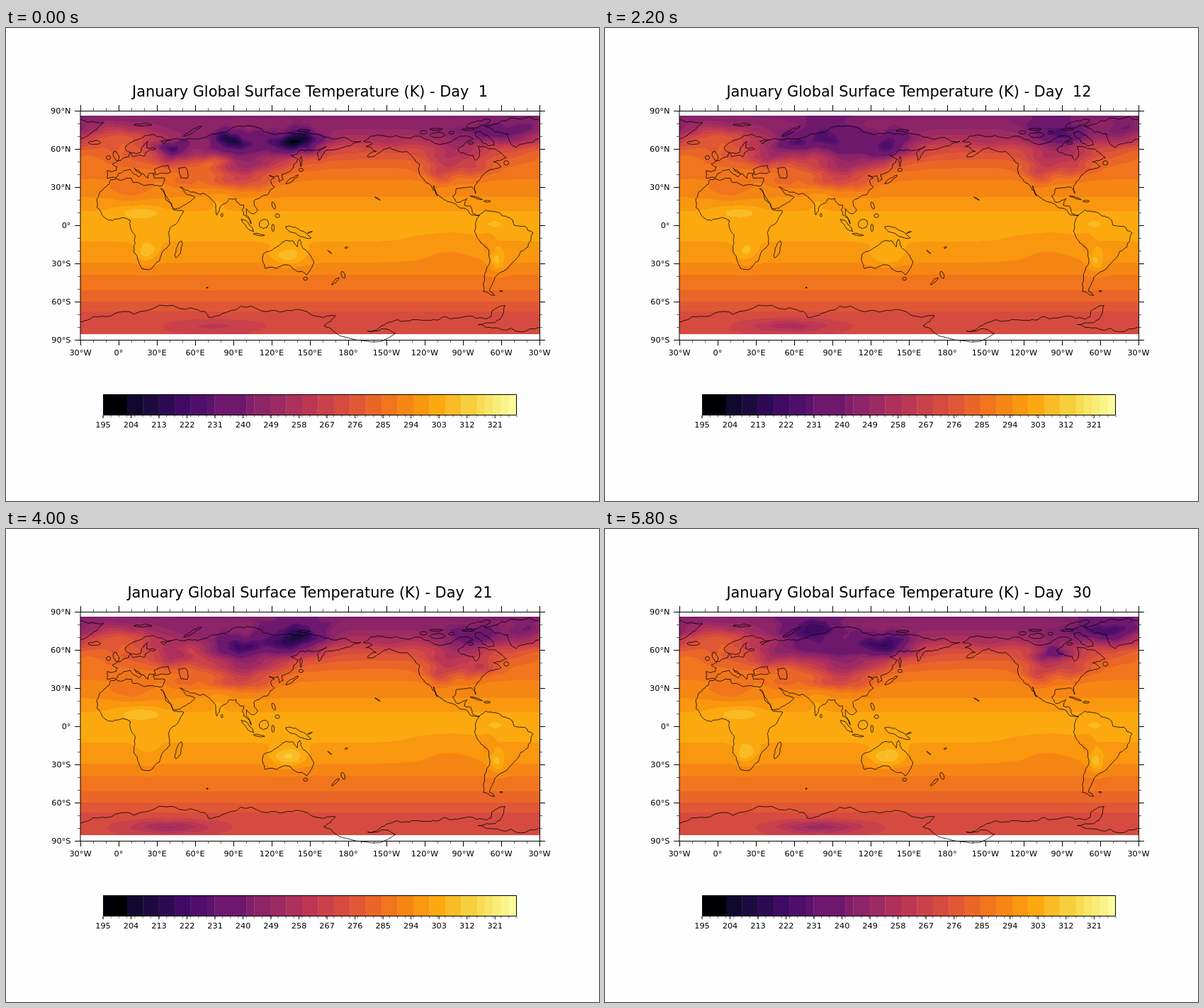
Animation, 837 px wide and 669 px high, one loop 6000 ms. Source, as an HTML page with a canvas:

```html
<!DOCTYPE html>
<html lang="en">
<head>
<meta charset="utf-8">
<title>January Global Surface Temperature</title>
<style>
html, body { margin: 0; width: 100%; height: 100%; overflow: hidden; background: #fefefe; }
canvas { position: absolute; left: 105px; top: 124px; }
svg { position: absolute; left: 0; top: 0; }
text { font-family: "DejaVu Sans", sans-serif; font-size: 11.3px; text-anchor: middle; white-space: pre; }
#title { font-size: 20.85px; }
path { fill: none; stroke: #000; }
</style>
</head>
<body>
<canvas id="field" width="648" height="309"></canvas>
<svg id="chart" width="837" height="669" viewBox="0 0 837 669"><text id="title" x="429" y="97"></text></svg>
<script>
const numbers = s => s.trim().split(/\s+/).map(Number);
const groups = (list, n) => Array.from({ length: list.length / n }, (_, i) => list.slice(i * n, i * n + n));
const px = lon => 105 + ((lon < -30 ? lon + 360 : lon) + 30) * 1.8;
const py = lat => 279 - lat * 1.8;
const chart = document.getElementById('chart');

function add(tag, attrs, text = '') {
  const el = document.createElementNS('http://www.w3.org/2000/svg', tag);
  for (const k in attrs) el.setAttribute(k, attrs[k]);
  el.textContent = text;
  chart.append(el);
}

// Seeded midpoint displacement turns a few points into a ragged shore
let seed = 7;
const random = () => (seed = seed * 16807 % 2147483647) / 2147483647 - .5;
function roughen(pts, amount) {
  return pts.flatMap((p, i) => {
    const q = pts[i + 1];
    if (!q) return [p];
    const k = random() * amount, dx = q[0] - p[0], dy = q[1] - p[1];
    return Math.hypot(dx, dy) < 4 ? [p] : [p, [(p[0] + q[0]) / 2 - dy * k, (p[1] + q[1]) / 2 + dx * k]];
  });
}
function shore(pts) {
  pts = pts.map(([lon, lat]) => [px(lon), py(lat)]);
  for (let i = 0; i < 3; i++) pts = roughen(pts, .3);
  add('path', { d: 'M' + pts.map(p => p.map(n => n.toFixed(1))).join('L'), 'stroke-width': .8 });
}
const coast = s => shore(groups(numbers(s), 2));
function island([lon, lat, rx, ry, tilt]) {
  const c = Math.cos(tilt * Math.PI / 180), s = Math.sin(tilt * Math.PI / 180), pts = [];
  for (let i = 0; i <= 8; i++) {
    const x = rx * Math.cos(i * Math.PI / 4), y = ry * Math.sin(i * Math.PI / 4);
    pts.push([lon + x * c - y * s, lat + x * s + y * c]);
  }
  shore(pts);
}

// Africa and Arabia
coast('-6 36 -10 30 -17 21 -17 14 -13 8 -8 4 4 6 9 4 9 -1 13 -8 12 -17 15 -27 18 -34 26 -34 32 -28 35 -20 40 -15 39 -6 43 0 51 11 43 12 37 20 33 29 35 28 43 13 52 16 60 22 54 24 48 30');
// Southern and eastern Asia
coast('48 30 52 28 57 26 67 25 72 21 77 8 80 15 87 21 92 21 95 16 98 16 98 8 104 1 100 8 100 13 105 9 109 12 106 19 110 21 117 24 122 30 119 35 122 37 118 39 125 39 126 34 129 36 128 40 135 43 141 52 135 55 143 59 155 59 163 62 156 57 157 51 163 59');
// Siberia, Europe and the Mediterranean
coast('163 59 178 62 190 66 178 69 160 70 140 72 128 72 113 74 104 78 81 73 73 72 68 69 54 68 44 68 35 64 33 66 41 67 28 71 14 67 5 61 7 58 12 57 17 57 18 61 23 66 22 61 29 60 21 57 20 54 11 54 9 57 8 54 -5 48 -1 46 -2 43 -9 43 -9 37 -2 37 4 43 9 44 16 38 18 40 12 45 20 40 23 37 24 41 29 41 28 44 33 46 39 47 41 42 27 40 28 37 36 37 34 31 20 31 11 34 10 37 -6 36');
// North and Central America
coast('-168 66 -157 71 -128 70 -96 68 -86 70 -82 68 -87 66 -94 60 -92 57 -82 55 -80 51 -77 56 -78 62 -70 60 -65 60 -56 53 -66 50 -60 46 -66 44 -70 43 -76 37 -81 31 -80 25 -83 30 -95 29 -98 23 -95 18 -91 19 -87 21 -89 16 -84 15 -82 9 -77 8 -83 8 -88 13 -95 16 -105 20 -113 31 -110 23 -117 33 -124 40 -124 48 -134 58 -147 61 -153 59 -165 54 -158 58 -166 62 -161 64 -168 66');
// South America
coast('-77 8 -72 12 -62 10 -51 4 -50 0 -35 -6 -39 -17 -48 -26 -58 -36 -65 -41 -69 -52 -65 -55 -74 -52 -73 -38 -70 -19 -76 -14 -81 -5 -77 8');
// Greenland, cut by the map edge
coast('-30.1 83 -60 82 -73 78 -55 72 -48 61 -40 65 -30.1 68');
coast('-30 83 -12 81 -20 74 -30 68');
// Australia, New Guinea, Caspian Sea
coast('114 -22 115 -34 124 -34 131 -31 138 -35 147 -39 153 -30 146 -19 142 -11 140 -17 136 -12 131 -12 122 -18 114 -22');
coast('131 -1 141 -3 151 -10 143 -9 133 -4 131 -1');
coast('49 37 47 45 53 45 54 37 49 37');
// Antarctica
coast('-30 -76 -17 -72 12 -70 53 -66 68 -68 70 -72 88 -67 120 -67 145 -67 170 -71 161 -79 168 -83 217 -85 195 -83 206 -79 -146 -76 -135 -75 -113 -74 -97 -73 -80 -73 -68 -72 -67 -67 -57 -63 -61 -74 -78 -78 -60 -82 -30.1 -80');

// Islands: lon lat width height tilt
groups(numbers(`-2 54.5 2 4 20 -8 53.2 1.7 1.6 0 143 50 .8 4 0 136 36 6 1.2 35 143 43.5 1.8 1.3 0 81 8 .8 1.4 0 47 -19 2 7 -18
101 0 7 1.4 -45 110 -7.3 4.5 .7 -8 114 1 4 3.6 40 121 -2 1 3 0 121.5 15.5 1.2 3 20 124.5 7.5 1.8 1.5 0 150 -5.5 2 .4 20
165.5 -21 2 .3 -40 178.5 -17.5 1.2 .5 20 146.5 -42 1.7 1.2 0 176 -39 1.4 3 20 170 -44 4 1 43 69.5 -49 .8 .4 0 -157 21 2.5 .3 -30
-79.5 21.6 5 .5 -17 -71 18.9 2.6 .7 0 -56 49 2 1.8 0 -60 -51.8 1.2 .4 0`), 5).forEach(island);
// Arctic islands
groups(numbers(`-19 65 5 1.4 0 19 79 7 1 0 58 74 8 1.2 30 145 74.5 5 .7 0 -73 68 9 3.5 -35 -110 71 6 2 0 -121 73 3 1.3 0
-78 80 10 2.5 15 -86 75.3 5 .7 0 -111 75.5 5 .8 0 -99 72.7 2.2 1.1 0 -84 64.7 2.5 1 0`), 5).forEach(island);

// Axes
let major = 'M105 117.5H753.5V441.5H105Z', minor = '';
for (let i = 0; i <= 36; i++) {
  const x = 105.5 + i * 18, len = i % 3 ? 4 : 8;
  const tick = `M${x} 117v${-len}M${x} 441v${len}`;
  if (i % 3) minor += tick; else {
    major += tick;
    const lon = i * 10 - 30, a = lon > 180 ? 360 - lon : Math.abs(lon);
    const side = a % 180 ? (lon < 0 || lon > 180 ? 'W' : 'E') : '';
    add('text', { x: x - .5, y: 463 }, a + '°' + side);
  }
}
for (let lat = -90; lat <= 90; lat += 10) {
  const y = py(lat) + .5, len = lat % 30 ? 4 : 8;
  const tick = `M105 ${y}h${-len}M753 ${y}h${len}`;
  if (lat % 30) minor += tick; else {
    major += tick;
    add('text', { x: 91.5, y: y + 3.6, style: 'text-anchor:end' }, Math.abs(lat) + '°' + (lat ? lat < 0 ? 'S' : 'N' : ''));
  }
}

// Colour bands: 52 levels, neighbours merged into wider steps
const low = 195, bands = 52, step = 133 / bands;
const stops = '000004 160b39 420a68 6a176e 932667 bc3754 dd513a f37819 fca50a f6d746 fcffa4'.split(' ')
  .map(h => [0, 2, 4].map(i => parseInt(h.slice(i, i + 2), 16)));
const palette = [];
for (let b = 0, end; b < bands; b = end) {
  end = b === 0 ? 3 : b === 14 ? 18 : b === 13 || b === 18 || b > 46 ? b + 1 : b + 2;
  const t = b ? (b + end) / 2 / bands * 10 : 0, k = Math.min(9, t | 0);
  const rgb = stops[k].map((c, j) => Math.round(c + (stops[k + 1][j] - c) * (t - k)));
  palette.push(...Array(end - b).fill(rgb));
  add('rect', { x: 137 + b * 584 / bands, y: 518, width: (end - b) * 584 / bands + .3, height: 29, fill: `rgb(${rgb})` });
}
major += 'M137.5 518.5H720.5V547.5H137.5Z';
for (let b = 0; b <= bands; b++) minor += `M${137 + b * 584 / bands} 548v2.5`;
for (let t = low; t < 328; t += 9) {
  const x = 137 + (t - low) * 584 / 133;
  major += `M${x} 548v4`;
  add('text', { x, y: 564.5 }, t);
}
add('path', { d: major, 'stroke-width': 1 });
add('path', { d: minor, 'stroke-width': .6 });

// Mean temperature by latitude: lat, kelvin
const profile = groups(numbers('-90 270 -75 271 -68 274 -60 279.4 -51 284.5 -39 289.6 -29 294.8 -13 299.9 0 302 11 300 22 294.8 36 289.6 46 284 54 278 60 272 66 262 74 250 90 240'), 2);
function zonal(lat) {
  const i = profile.findIndex(p => p[0] >= lat), [x0, t0] = profile[i - 1], [x1, t1] = profile[i];
  return t0 + (t1 - t0) * (lat - x0) / (x1 - x0);
}

// Lasting warm and cold regions: lon lat width height kelvin
const steady = groups(numbers(`0 70 26 9 20 95 60 45 11 -32 135 63 18 8 -16 100 45 25 9 -25 90 34 18 5 -15 42 55 15 8 -17 112 31 9 5 -8
52 34 12 5 -8 -150 65 14 5 -6 -95 58 22 11 -17 -85 72 30 6 -6 -105 45 14 9 -16 -108 37 7 5 -8 -80 45 12 7 -11 -42 72 13 9 -10
-25 55 22 10 7 10 27 17 6 -6 15 11 18 5 5 22 -20 8 9 6 78 19 7 6 4 133 -24 14 8 6 -63 -28 6 9 7 -65 1 8 4 5 -72 -15 4 7 -4
-100 -17 30 12 -3`), 5);

const days = [1, 4, 9, 16, 21, 25, 30];
// Five northern spots on each of these days: lon lat size kelvin
const north = groups(numbers(`142 66 8 -40 88 67 6 -32 42 61 5.5 -30 74 50 5 16 -65 72 7 -14
120 64 7 -34 65 68 6 -34 52 59 5 -22 -104 56 6 -14 -40 69 5 -15
58 65 6 -37 85 75 10 -18 130 56 7 -26 80 56 6 18 -100 75 10 -18
85 67 8 -17 140 68 8 -22 -88 69 7 -28 30 54 5 -13 -78 54 6 -9
140 71 10 -32 95 63 6 -19 -80 69 8 -14 -73 47 5 -10 58 60 6 14
142 65 8 -36 113 76 9 -17 48 66 10 16 -130 68 7 -9 -70 48 4 -12
73 77 9 -26 132 64 9 -20 -98 57 5 -24 -58 75 9 -20 65 62 9 -8`), 4);
// Sahel, southern Africa, Australia, South America; then Antarctic longitude and kelvin
const south = groups(numbers(`5 6 6 5 75 -8 3 7 1 8 108 -9 4 5 0 7 60 -10 2 0 6 1 55 -22
6 -4 9 5 40 -18 3 4 10 5 40 -19 5 7 8 6 80 -20`), 6);
const weather = days.map((day, i) => {
  const [sahel, africa, australia, america, lon, pole] = south[i];
  const spots = north.slice(i * 5, i * 5 + 5).map(([x, y, size, t]) => [x, y, size * 2.2, size, t]);
  spots.push([18, 9, 14, 4, sahel], [22, -21, 7, 6, africa], [133, -24, 12, 6, australia],
    [-64, -28, 6, 7, america], [lon, -79, 32, 5, pole]);
  return { day, spots };
});

function sum(spots, lon, lat) {
  let total = 0;
  for (const [x, y, w, h, t] of spots) {
    const dx = ((lon - x + 900) % 360 - 180) / w, dy = (lat - y) / h;
    const d = dx * dx + dy * dy;
    if (d < 8) total += t * Math.exp(-d);
  }
  return total;
}

const ctx = document.getElementById('field').getContext('2d');
const image = ctx.createImageData(648, 309);
const cols = 146, cell = 4.5;

function paint(day) {
  let k = 0;
  while (k < weather.length - 2 && day >= weather[k + 1].day) k++;
  const a = weather[k], b = weather[k + 1], mix = (day - a.day) / (b.day - a.day);
  const grid = [];
  for (let r = 0; r < 71; r++) for (let c = 0; c < cols; c++) {
    const lon0 = c * 2.5 - 30, lat0 = 86 - r * 2.5;
    // Ragged edges, strongest in the north
    const rough = lat0 > 0 ? Math.max(.3, Math.min(1, lat0 / 40)) : .3;
    const lon = lon0 + rough * 2.5 * Math.sin(lat0 * .5 + lon0 * .05);
    const lat = lat0 + rough * (Math.sin(lon0 * .21) + .6 * Math.sin(lon0 * .47 - lat0 * .2));
    grid.push(zonal(Math.max(-89, lat0)) + sum(steady, lon, lat) + (1 - mix) * sum(a.spots, lon, lat) + mix * sum(b.spots, lon, lat));
  }
  let p = 0;
  for (let y = 0; y < 309; y++) {
    const r = y / cell | 0, v = y / cell - r;
    for (let x = 0; x < 648; x++) {
      const c = x / cell | 0, u = x / cell - c, i = r * cols + c;
      const t = (grid[i] * (1 - u) + grid[i + 1] * u) * (1 - v) + (grid[i + cols] * (1 - u) + grid[i + cols + 1] * u) * v;
      const rgb = palette[Math.max(0, Math.min(bands - 1, (t - low) / step | 0))];
      for (let j = 0; j < 3; j++) image.data[p++] = rgb[j];
      image.data[p++] = 255;
    }
  }
  ctx.putImageData(image, 0, 0);
  document.getElementById('title').textContent = 'January Global Surface Temperature (K) - Day\u00a0\u00a0' + day;
}

const start = performance.now();
let shown = 0;
function tick() {
  const day = Math.floor((performance.now() - start) % 6000 / 200) + 1;
  if (day !== shown) paint(shown = day);
  requestAnimationFrame(tick);
}
tick();
</script>
</body>
</html>
```
